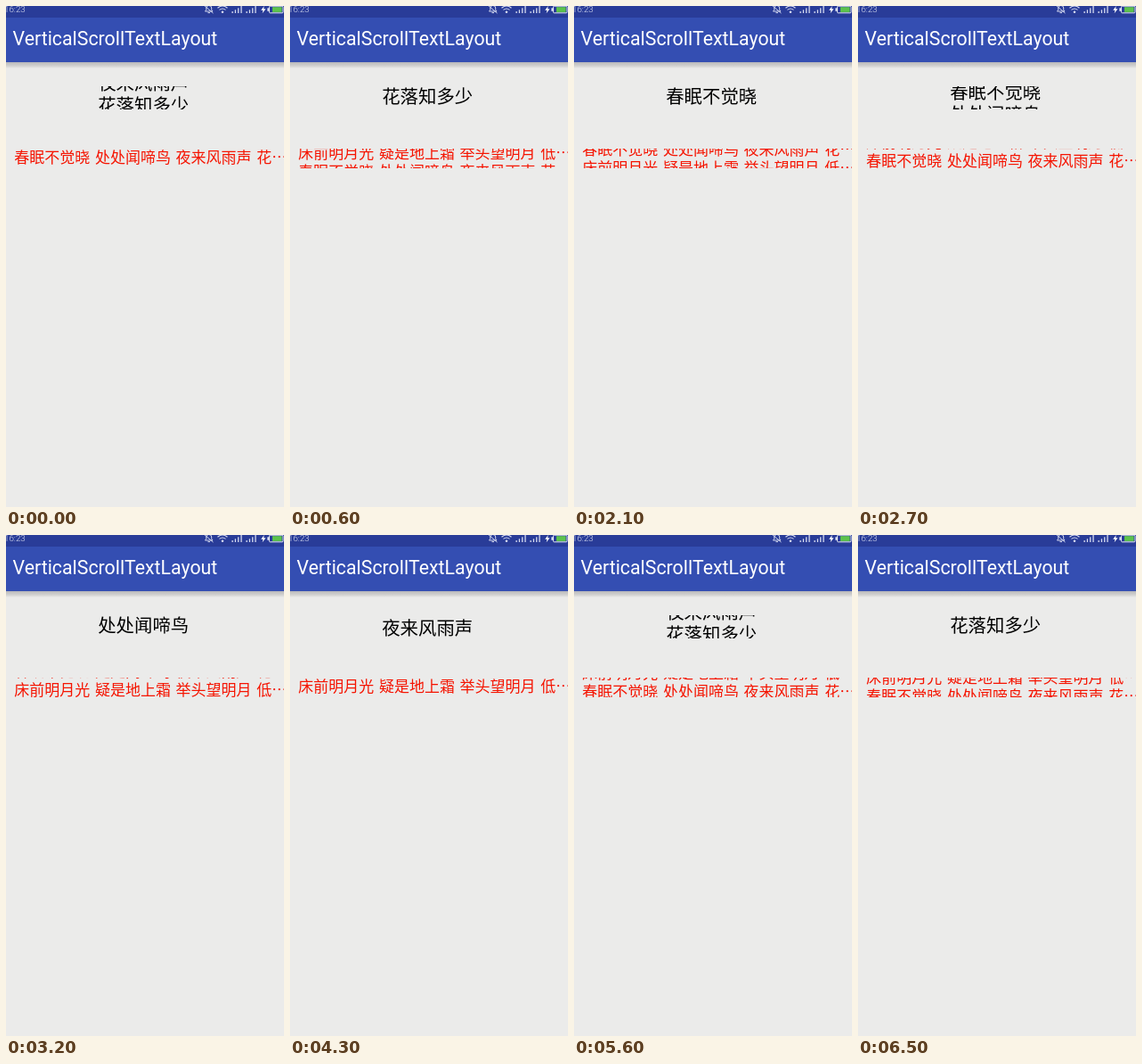
Recreate the animation shown at these times as an HTML page. Size 312 by 562 pixels, loop 6.6 s.

```html
<!DOCTYPE html>
<html lang="zh-CN">
<head>
<meta charset="utf-8">
<title>VerticalScrollTextLayout</title>
<style>
  html, body { margin: 0; width: 100%; height: 100%; overflow: hidden; background: #ebebea; }
  svg { display: block; width: 312px; height: 562px; }
  .latin { font-family: Roboto, "Open Sans", sans-serif; fill: #fff; }
  .title { font-size: 21.3px; }
  .clock { font-size: 9.8px; font-weight: 300; fill: #dde1f2; }
  .verse { font-family: "Noto Sans CJK SC", "Noto Sans CJK", sans-serif; }
  #poem { font-size: 20.4px; fill: #000; text-anchor: middle; }
  #ticker { font-size: 17px; fill: #f51400; word-spacing: 1.9px; }
  .line { fill: none; stroke: #d5daf0; }
  .solid { fill: #d5daf0; }
</style>
</head>
<body>
<svg viewBox="0 0 312 562">
  <defs>
    <linearGradient id="shade" x2="0" y2="1">
      <stop offset="0" stop-color="#b9b9ba"/>
      <stop offset=".6" stop-color="#d2d2d1"/>
      <stop offset="1" stop-color="#ebebea"/>
    </linearGradient>
    <clipPath id="poemBox"><rect x="9" y="90" width="303" height="26"/></clipPath>
    <clipPath id="tickerBox"><rect x="9" y="160" width="303" height="22"/></clipPath>
    <g id="signal" class="solid">
      <rect y="6" width="1.3" height="2"/>
      <rect x="3.3" y="4.3" width="1.3" height="3.7"/>
      <rect x="6.6" y="2.3" width="1.3" height="5.7"/>
      <rect x="9.9" width="1.3" height="8"/>
    </g>
  </defs>

  <rect width="312" height="562" fill="#ebebea"/>
  <rect y="63" width="312" height="7" fill="url(#shade)"/>
  <rect width="312" height="63" fill="#344eb2"/>
  <rect width="312" height="13" fill="#293c98"/>

  <text class="latin clock" x="-2" y="7.2">16:23</text>
  <g class="line">
    <path d="M223.5 6h8.500l-1.300-1.700V2q0-2.500-3-2.500T224.800 2v2.300zM226.500 7.600h2.500M222.500-.5l10 8.500"/>
    <path d="M237.500 2.200q5.500-4.500 11 0M239.500 4.400q3.500-2.800 7 0" stroke-width="1.1"/>
  </g>
  <circle class="solid" cx="243" cy="6.700" r="1.300"/>
  <use href="#signal" x="253.500"/>
  <use href="#signal" x="269.500"/>
  <path d="M289.800 0l-3.600 4.700h2.300l-.8 3.500 3.800-4.900h-2.400z" fill="#fff"/>
  <rect x="295.500" y=".2" width="15.500" height="7.600" rx="1" fill="none" stroke="#e4e7f3"/>
  <rect class="solid" x="293.300" y="2.300" width="1.700" height="3.500"/>
  <rect x="299" y="1.200" width="10.600" height="5.700" fill="#5cc34c"/>

  <text class="latin title" x="7.600" y="44.200">VerticalScrollTextLayout</text>

  <g clip-path="url(#poemBox)"><g id="poem" class="verse"></g></g>
  <g clip-path="url(#tickerBox)"><g id="ticker" class="verse"></g></g>
</svg>
<script>
  const LOOP = 6600, TICK = 100, SLIDE = 370;

  // start: time of a slide that brings in the line with index `first`
  const scrollers = [
    { id: 'poem', x: 154.2, base: 109, pitch: 25, period: 1400, start: -139, first: 3,
      lines: ['春眠不觉晓', '处处闻啼鸟', '夜来风雨声', '花落知多少'] },
    { id: 'ticker', x: 9.2, base: 175.5, pitch: 21, period: 487, start: 71, first: 1,
      lines: ['春眠不觉晓 处处闻啼鸟 夜来风雨声 花…', '床前明月光 疑是地上霜 举头望明月 低…'] }
  ];

  function addText(s) {
    const el = document.createElementNS('http://www.w3.org/2000/svg', 'text');
    el.setAttribute('x', s.x);
    document.getElementById(s.id).append(el);
    return el;
  }

  for (const s of scrollers) s.pair = [addText(s), addText(s)];

  const lineAt = (s, i) => s.lines[(i + s.lines.length) % s.lines.length];

  function place(s, t) {
    const n = Math.floor((t - s.start) / s.period);
    const x = Math.min(1, (t - s.start - n * s.period) / SLIDE);
    const left = (1 - x) ** 2;
    s.pair.forEach((el, k) => {
      el.textContent = lineAt(s, s.first + n - 1 + k);
      el.setAttribute('y', s.base + s.pitch * (left - 1 + k));
    });
  }

  function draw() {
    const t = Math.floor(performance.now() % LOOP / TICK) * TICK;
    for (const s of scrollers) place(s, t);
    requestAnimationFrame(draw);
  }
  draw();
</script>
</body>
</html>
```
